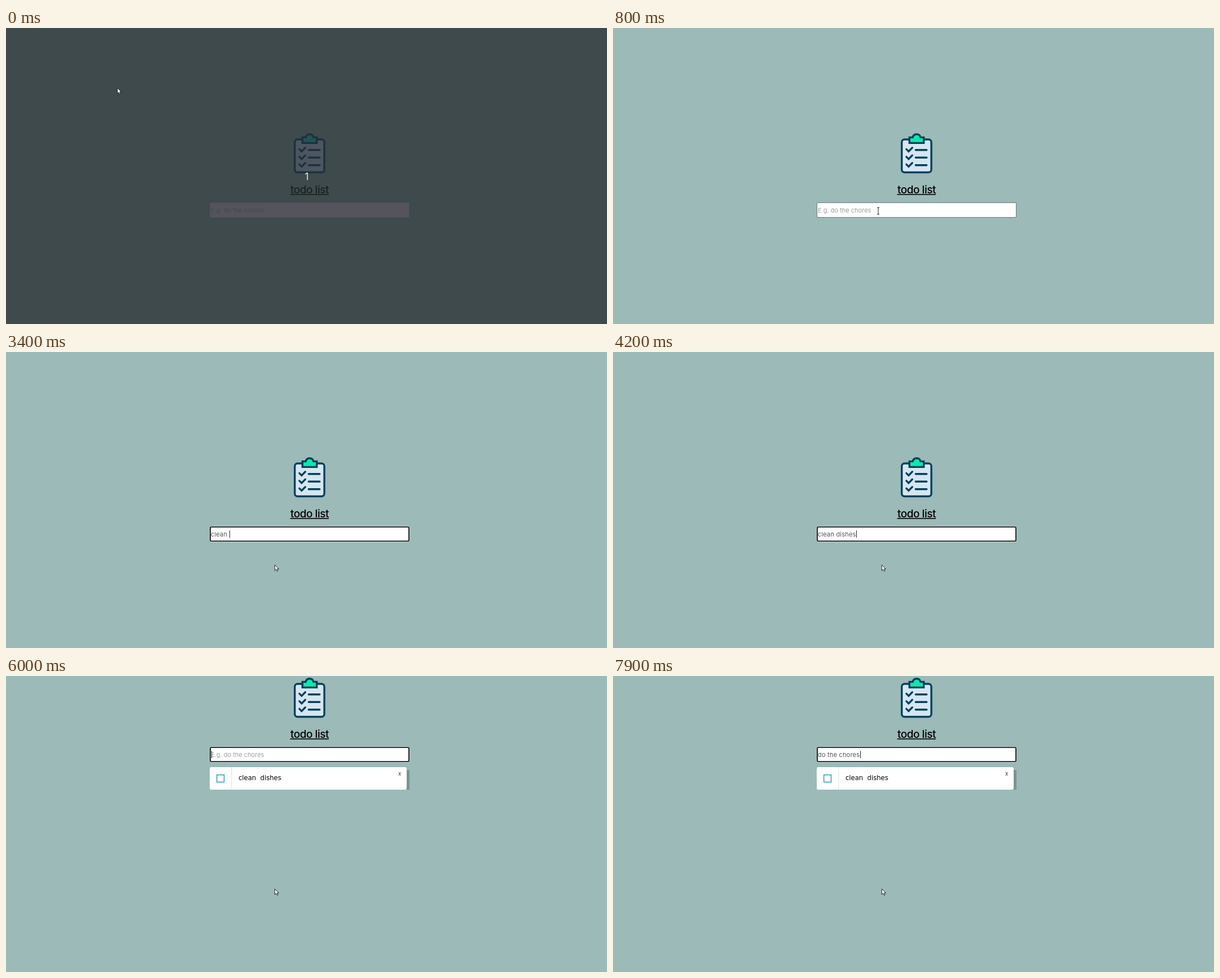
Recreate the animation shown at these times as an HTML page. Size 1065 px wide and 526 px high, loop 8000 ms.

```html
<!DOCTYPE html>
<html lang="en">
<head>
<meta charset="utf-8">
<title>todo list</title>
<style>
  html, body { margin: 0; width: 100%; height: 100%; overflow: hidden; }
  svg {
    display: block; width: 1065px; height: 526px;
    --bg: #9bbab8; --ink: #053f5c; --paper: #d6e6f3; --clip: #0aeaaa;
    --title: #000; --field: #fff; --edge: #6f7778; --hint: #9b9f9f;
    background: var(--bg);
  }
  svg.dim {
    --bg: #3e4a4b; --ink: #1b323d; --paper: #4d5560; --clip: #1f5457;
    --title: #1a2122; --field: #55545c; --edge: #4b4f54; --hint: #444a4f;
  }
  text { font-family: Inter, sans-serif; white-space: pre; }
  .title { font-size: 19px; font-weight: 500; letter-spacing: -.5px; fill: var(--title); }
  .icon { fill: none; stroke: var(--ink); stroke-width: 3.4; stroke-linecap: round; }
  .hint, .typed { font-size: 11px; }
  .hint { fill: var(--hint); }
  .typed { fill: #555; letter-spacing: .2px; }
  .item { font-family: "DejaVu Sans", sans-serif; font-size: 11.6px; }
  [hidden] { display: none; }
</style>
</head>
<body>
<svg id="stage" viewBox="0 0 1065 526">
  <g id="app">
    <g class="icon">
      <rect x="511.7" y="198" width="52.4" height="58.5" rx="5" fill="var(--paper)"/>
      <path fill="var(--clip)" d="M525.3 204.4V194.4H531C532 190.6 534.8 188.7 538 188.7S544 190.6 545 194.4H550.7V204.4Z"/>
      <g id="row"><path d="M519.9 215.4l4 4l6.4-6.6M536.3 216.7H555.8"/></g>
      <use href="#row" y="13.5"/>
      <use href="#row" y="27"/>
    </g>
    <text class="title" x="538" y="293.5" text-anchor="middle">todo list</text>
    <rect x="503.5" y="295" width="68.5" height="1.6" fill="var(--title)"/>

    <rect x="361.5" y="310.5" width="353" height="26" rx="1.5" fill="var(--field)" stroke="var(--edge)"/>
    <g id="ring" fill="none">
      <rect x="361.2" y="310.2" width="353.6" height="26.8" rx="2" stroke="#e6eeee" stroke-width="1"/>
      <rect x="362" y="311" width="352" height="25" rx="1.5" stroke="#000" stroke-width="1.7"/>
    </g>
    <text id="hint" class="hint" x="363" y="328">E.g. do the chores</text>
    <text id="typed" class="typed" x="363" y="328"></text>
    <rect id="caret" y="317" width="1" height="13" fill="#222"/>
  </g>

  <g id="card">
    <rect x="366" y="167" width="349" height="35" fill="#7b9391"/>
    <rect x="361" y="162" width="349" height="40" rx="3" fill="#fff"/>
    <rect x="398.8" y="162" width="2" height="40" fill="#ebeeee"/>
    <rect x="373.7" y="175.7" width="12.8" height="12.8" fill="none" stroke="#2b9dc2" stroke-width="1.5"/>
    <text class="item" x="412" y="184.5">clean  dishes</text>
    <text x="697.5" y="176.6" text-anchor="middle" font-size="9.5" fill="#333">x</text>
  </g>

  <g id="count">
    <text x="533" y="269.5" text-anchor="middle" font-size="17" fill="#d9f2ee">1</text>
    <rect y="524" width="1065" height="2" fill="#434b50"/>
  </g>

  <path id="arrow" d="M0 0V10L2.4 7.8L4 11.4L5.7 10.7L4.2 7.2H7Z" fill="#fff" stroke="#111" stroke-width=".9"/>
  <path id="beam" d="M-2-6H2M0-6V6M-2 6H2" fill="none" stroke="#222"/>
</svg>
<script>
const LOOP = 8000, STEP = 100, FOCUS = 1000, SUBMIT = 4300;
const $ = id => document.getElementById(id);
const [stage, app, ring, hint, typed, caret, card, count, arrow, beam] =
  ["stage", "app", "ring", "hint", "typed", "caret", "card", "count", "arrow", "beam"].map($);

// [time, field value]
const typing = [
  [0, ""], [2800, "cl"], [3000, "cle"], [3100, "clea"], [3200, "clean"],
  [3400, "clean "], [3600, "clean d"], [3700, "clean di"], [3900, "clean dish"],
  [4100, "clean dishe"], [4200, "clean dishes"], [SUBMIT, ""],
  [6300, "d"], [6400, "do"], [6600, "do "], [6800, "do th"], [6900, "do the "],
  [7100, "do the c"], [7200, "do the ch"], [7500, "do the c"], [7600, "do the cho"],
  [7800, "do the chore"], [7900, "do the chores"]
];
const blinks = [[0, false], [FOCUS, true], [1500, false], [2100, true],
  [4900, false], [6000, true], [6100, false], [6300, true]];

const at = (list, t) => list.findLast(entry => entry[0] <= t)[1];
const show = (el, on) => el.toggleAttribute("hidden", !on);

function pointer(t) {
  if (t >= 1400) return [476.3, 378.3];
  if (t >= 1200) return [474, 337];
  if (t >= 1100) return [472, 329];
  const u = Math.min(1, Math.max(0, (t - 100) / 700));
  const k = u * u * (3 - 2 * u);
  return [197.3 + 272.7 * k, 106.4 + 218.6 * k];
}

function draw(now) {
  const t = Math.floor(now % LOOP / STEP) * STEP;
  const value = at(typing, t);
  const done = t >= SUBMIT;
  const inField = t >= 800 && t < 1200;

  stage.classList.toggle("dim", t < STEP);
  show(count, t < STEP);
  app.setAttribute("transform", `translate(0 ${done ? -184 : 0})`);
  show(card, done);
  show(ring, t >= FOCUS);

  if (typed.textContent !== value) typed.textContent = value;
  show(hint, !value);
  show(caret, at(blinks, t));
  const width = value ? typed.getComputedTextLength() : 0;
  caret.setAttribute("x", Math.round(363.6 + width));

  const place = `translate(${pointer(t)})`;
  arrow.setAttribute("transform", place);
  beam.setAttribute("transform", place);
  show(arrow, !inField);
  show(beam, inField);
}

function tick() {
  draw(performance.now());
  requestAnimationFrame(tick);
}
tick();
</script>
</body>
</html>
```
